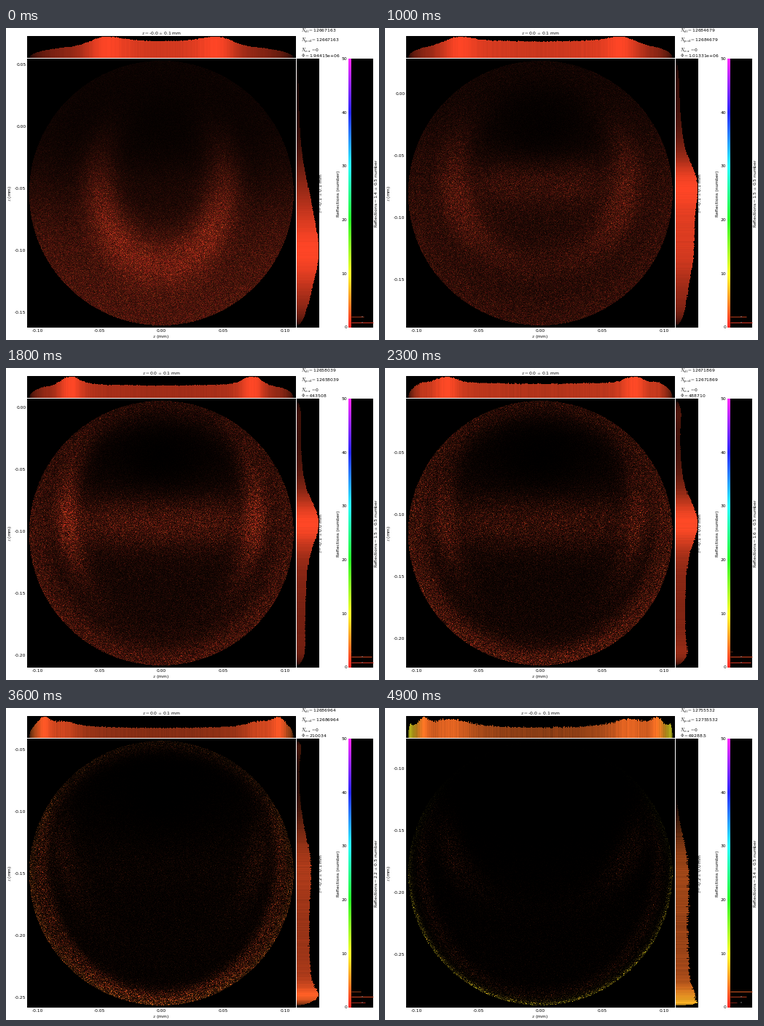
Recreate the animation shown at these times as a matplotlib script. Size 512 by 428 pixels, loop 5 s.

```python
import numpy as np
import matplotlib.pyplot as plt
from matplotlib.animation import FuncAnimation
from matplotlib.colors import hsv_to_rgb

W, H, DPI = 512, 428, 64
FRAMES, INTERVAL = 50, 100
BINS = 369
MID_X, MID_Y, RADIUS = 213.3, 226.5, 181.5
PX_PER_MM = 1700
SATURATION = 0.85

# Ray count and flux read-outs at a few moments
READ_AT = [0, 5, 10, 18, 28, 36, 49]
RAYS = [12667163, 12607681, 12684679, 12658039, 12685699, 12686964, 12755532]
FLUX = [1.94415e6, 1.38169e6, 1.01331e6, 643508, 371149, 210034, 69288.5]

plt.rcParams.update({"font.family": "DejaVu Sans", "mathtext.fontset": "cm"})


def bell(x):
    return np.exp(-x**2 / 2)


def step(x):
    return 1 / (1 + np.exp(-x))


def ease(t, start, end):
    p = np.clip((t - start) / (end - start), 0, 1)
    return p * p * (3 - 2 * p)


def to_rgb(reflections, value):
    """Colour for a reflection count: hue runs red to magenta over 0..50."""
    hue = np.clip(reflections, 0, 50) / 60
    value = np.clip(value, 0, 1)
    return hsv_to_rgb(np.stack([hue, np.full_like(hue, SATURATION), value], axis=-1))


x_px = 29 + np.arange(BINS) + .5
y_px = 42 + np.arange(BINS) + .5
u, v = np.meshgrid((x_px - MID_X) / RADIUS, (y_px - MID_Y) / RADIUS)
r = np.hypot(u, v)


def diffuse_fill(t):
    middle = .05 - .65 * np.sin(np.pi * t)
    hole_v = -.05 - .5 * ease(t, 0, .37)
    hole = (.35 + .5 * ease(t, 0, .3)) * bell(u / .3) * bell((v - hole_v) / .27)
    return .25 * np.exp(-3 * t) * (.06 + step((v - middle) / .2)) * (1 - hole)


def arms(t):
    """A U that opens outwards, flares up once and then fades."""
    level = .05 + .2 * (1 - t)**2 + .13 * bell((t - .37) / .07)
    half_width = .47 + .29 * (1 - np.exp(-5 * t))
    half_height = .72 + .25 * ease(t, .15, .4)
    rho = np.hypot(u / half_width, (v + .15 + .45 * t**3) / half_height)
    thickness = .2 - .11 * ease(t, 0, .37)
    gate = bell((v - .25 + .37 * ease(t, 0, .35)) / (.4 - .2 * t))
    return level * bell((rho - 1) / thickness) * gate


def band(t):
    reach = .4 + .35 * ease(t, .1, .4)
    level = .2 * bell((t - .34) / .17)
    return level * bell((v + .08) / (.12 + .04 * t)) * np.exp(-(u / reach)**4)


def rim(t):
    """A ring that thins out and retreats to the bottom of the disc."""
    low = 1 - t**1.5 * (1 - step((v - .05) / .2))
    thickness = .025 + .21 * (1 - t)
    return (.03 + .18 * ease(t, .1, .5)) * np.exp(-((1 - r) / thickness)**2) * low


def crescent(t):
    inner = np.hypot(u / .9, (v + .1) / 1.04)
    return (.12 * bell((t - .75) / .18) * bell((inner - 1) / .04)
            * step((v + .4) / .1))


def density(t):
    return (diffuse_fill(t) + arms(t) + band(t) + rim(t) + crescent(t)) * (r < 1)


def mean_reflections(t):
    return 1.44 + 1.98 * t**3


def rim_reflections(t, depth, width):
    """Extra reflections near the rim, late in the loop."""
    return 6.5 * t**5 * np.exp(-(depth / width)**2)


def spot_image(light, t, rng):
    grain = 12 * np.exp(-2.5 * t)
    inside = min(mean_reflections(t), 2.2)
    reflections = inside + rim_reflections(t, 1 - r, .05)
    reflections = reflections + rng.normal(0, .3 + .3 * inside, r.shape)
    return to_rgb(np.maximum(reflections, .6), light * rng.gamma(grain, 1 / grain, r.shape))


def histogram(heights, edge, t, rng):
    """Bars standing on the bottom row, each as bright as it is high."""
    jitter = .012 + .03 * t**2
    heights = heights / heights.max() * (1 + jitter * rng.normal(size=BINS))
    heights = np.clip(heights, 0, 1)
    bars = to_rgb(mean_reflections(t) + edge, heights**.85)
    level = (29.5 - np.arange(30))[:, None] / 30
    return bars[None] * (level < heights * .98)[..., None]


def reflection_shares(t):
    """Share of rays with one, two and three reflections, largest set to 1."""
    counts = np.array([1 - .6 * t, .57 + .4 * t, 1.33 * t**4])
    return counts / counts.max()


fig = plt.figure(figsize=(W / DPI, H / DPI), dpi=DPI, facecolor="white")
ax = fig.add_axes([0, 0, 1, 1])
ax.axis("off")


def panel(x0, x1, y0, y1, pixels=None):
    pixels = np.zeros((1, 1, 3)) if pixels is None else pixels
    return ax.imshow(pixels, extent=(x0, x1, y1, y0), aspect="auto",
                     interpolation="nearest")


def label(x, y, text="", ha="center", va="center", rotation=0):
    return ax.text(x, y, text, fontsize=6 * 72 / DPI, ha=ha, va=va, rotation=rotation)


def value_y(count):
    return 411 - count * 7.37


spot = panel(29, 398, 42, 411)
x_hist = panel(29, 398, 11, 41)
z_hist = panel(399, 429.5, 42, 411)
scale = np.linspace(50, 0, 369)[:, None]
panel(470, 474, 42, 411, to_rgb(scale, np.ones_like(scale)))
panel(474, 504, 42, 411)

bars = [ax.plot([], [], lw=72 / DPI, solid_capstyle="butt")[0] for _ in range(3)]
ax.plot([489, 489], [value_y(1), value_y(2)], "+", color="grey", ms=3, mew=.5)

for tick in (-.10, -.05, 0, .05, .10):
    label(MID_X + tick * PX_PER_MM, 415.5, f"{tick:.2f}")
for tick in range(0, 51, 10):
    label(468, value_y(tick), str(tick), ha="right")
label(213, 423, "$x$ (mm)")
label(5.5, 227, "$z$ (mm)", rotation=90)
label(456.5, 227, "Reflections (number)", rotation=90)

x_title = label(213.5, 6.5)
z_title = label(432.5, 227, rotation=90)
r_title = label(507.5, 227, rotation=90)
z_ticks = [label(27.5, 0, ha="right") for _ in range(5)]
info = [label(405, y, ha="left", va="baseline") for y in (6, 19, 32.6, 39.5)]

ax.set_xlim(0, W)
ax.set_ylim(H, 0)


def mean_text(name, mean, std, unit):
    return rf"{name}$=${mean}$\,\pm\,${std:.1f} {unit}"


def draw_bars(t):
    for count, (bar, share) in enumerate(zip(bars, reflection_shares(t)), 1):
        bar.set_data([474, 474 + 30 * share], [value_y(count)] * 2)
        bar.set_color(to_rgb(np.array(float(count)), np.array(.3 + .55 * share)))
        bar.set_visible(share > .03)


def draw_z_ticks(frame):
    centre = -.0538 - .00266 * frame
    lowest = int(np.ceil((centre - .1085) / .05))
    for k, text in enumerate(z_ticks, lowest):
        y = MID_Y + (centre - k * .05) * PX_PER_MM
        text.set_text(f"{k * .05:.2f}")
        text.set_y(y + .4)
        text.set_visible(42 <= y <= 411)


def draw_titles(frame, t):
    x_mean = "-0.0" if frame % 7 == 0 else "0.0"
    z_std = .05 + .012 * np.cos(2 * np.pi * (t - .05) / .72)
    x_title.set_text(mean_text("$x$", x_mean, .1, "mm"))
    z_title.set_text(mean_text("$z$", f"{-.08 - .11 * t:.1f}", z_std, "mm"))
    r_title.set_text(mean_text("Reflections", f"{mean_reflections(t):.1f}", .5, "number"))

    rays = round(np.interp(frame, READ_AT, RAYS))
    flux = np.exp(np.interp(frame, READ_AT, np.log(FLUX)))
    lines = (rf"$N_{{\rm all}}=${rays}", rf"$N_{{\rm good}}=${rays}",
             r"$N_{\rm over}=$0", rf"$\Phi=${flux:g}")
    for text, line in zip(info, lines):
        text.set_text(line)


def draw(frame):
    t = frame / (FRAMES - 1)
    rng = np.random.default_rng(frame)
    light = density(t)
    spot.set_data(spot_image(light, t, rng))

    x_edge = rim_reflections(t, 1 - abs(u[0]), .07)
    x_hist.set_data(histogram(light.sum(axis=0), x_edge, t, rng))
    z_edge = rim_reflections(t, 1 - v[:, 0], .12) / 2
    z_bars = histogram(light.sum(axis=1), z_edge, t, rng)
    z_hist.set_data(z_bars[::-1].swapaxes(0, 1))

    draw_bars(t)
    draw_z_ticks(frame)
    draw_titles(frame, t)


anim = FuncAnimation(fig, draw, frames=FRAMES, interval=INTERVAL,
                     init_func=lambda: draw(0), repeat=True, repeat_delay=0)
plt.show()
```
